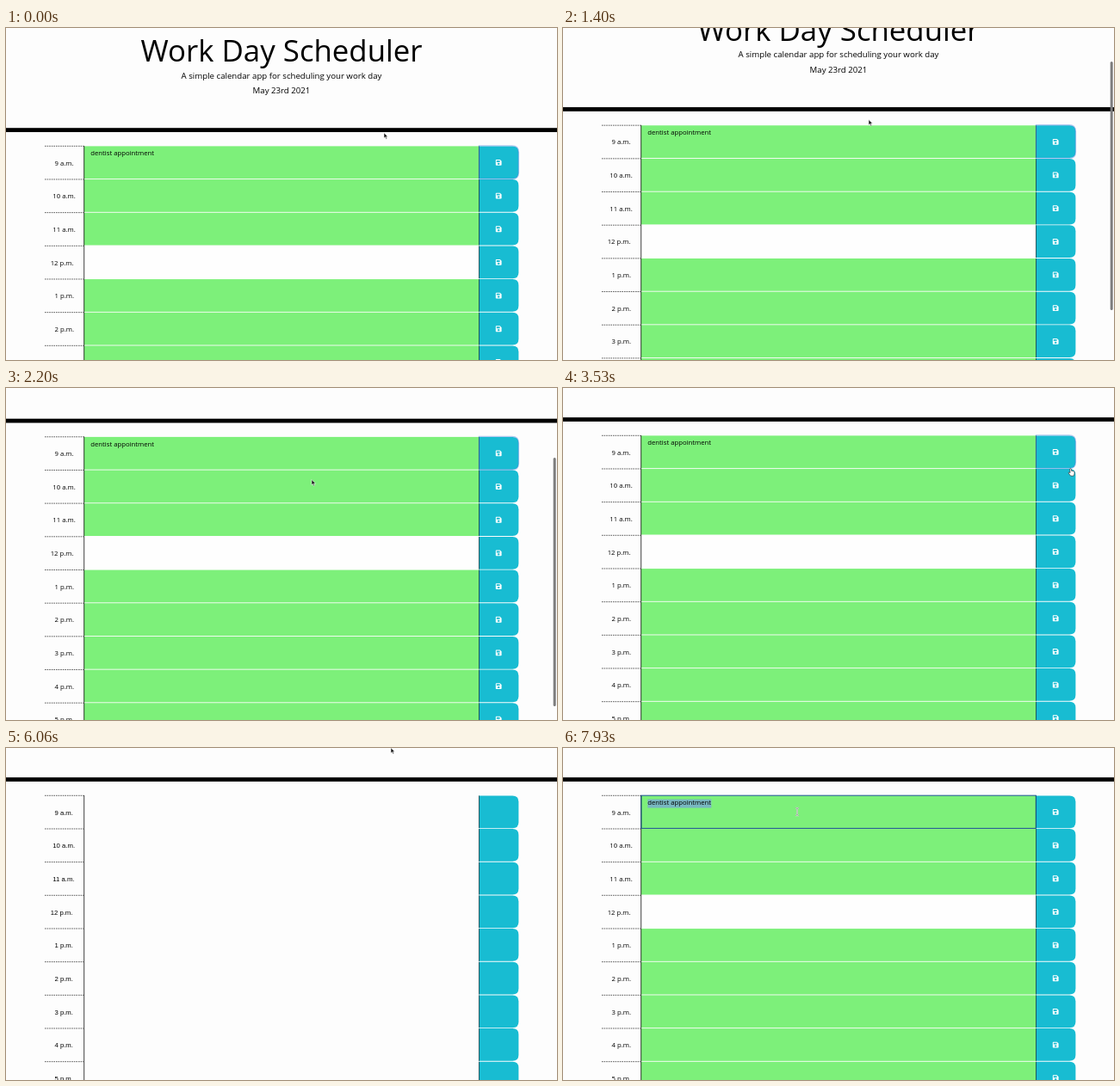
These frames come from a looping animation (640x386 px, 8 s). An HTML page:

```html
<!DOCTYPE html>
<html lang="en">
<head>
<meta charset="utf-8">
<title>Work Day Scheduler</title>
<style>
  html, body { margin: 0; width: 100%; height: 100%; overflow: hidden; background: #fdfdfd; }
  svg { display: block; width: 640px; height: 386px; }
  text { font-family: "Open Sans", "Noto Sans", sans-serif; font-size: 7.73px; fill: #000; white-space: pre; }
  .title { font-size: 34.8px; }
  .lead { font-size: 9.67px; }
  .unstyled text { font-family: "Liberation Sans", Arial, sans-serif; }
  .unstyled .slot, .unstyled .icon, .unstyled .note { display: none; }
</style>
</head>
<body>
<svg id="stage" viewBox="0 0 640 386">
  <g id="page">
    <text class="title" x="320" y="39" text-anchor="middle">Work Day Scheduler</text>
    <text class="lead" x="320" y="58.6" text-anchor="middle">A simple calendar app for scheduling your work day</text>
    <text class="lead" x="320" y="75.9" text-anchor="middle">May 23rd 2021</text>
    <rect y="116.2" width="640" height="4.83"/>
    <g id="rows"></g>
    <rect id="selection" x="98.3" y="141.6" width="74" height="10" fill="#78b7c0"/>
    <text class="note" x="98.3" y="148.4">dentist appointment</text>
    <rect id="outline" x="90.9" y="137.2" width="458.4" height="38.2" fill="none" stroke="#14508c"/>
    <path id="ring" fill="none" stroke="#5082dc" stroke-opacity=".42" stroke-width="1.4"/>
  </g>
  <rect id="thumb" x="635.7" width="3" height="289" rx="1.5" fill="#7d7d7d"/>
  <g id="pointer" stroke-linejoin="round">
    <path id="arrow" d="M0 0V6.3L1.5 5L2.5 7.4L3.6 6.9L2.6 4.6H4.5Z" fill="#111" stroke="#fff" stroke-width=".6"/>
    <path id="hand" d="M-1.3 0Q-.5 -.9 .2 0L.7 2.4Q3.2 2.2 4 3.4V6L3.2 8.2H-.3L-2.8 5Q-3 3.8 -1.8 4.1L-.9 4.7Z" fill="#fff" stroke="#222" stroke-width=".6"/>
    <g id="beam" fill="none">
      <path d="M-2 -4.5Q0 -4.5 0 -3.2Q0 -4.5 2 -4.5M0 -3.2V3.2M-2 4.5Q0 4.5 0 3.2Q0 4.5 2 4.5" stroke="#e6f6e6" stroke-width="1.7"/>
      <path d="M-2 -4.5Q0 -4.5 0 -3.2Q0 -4.5 2 -4.5M0 -3.2V3.2M-2 4.5Q0 4.5 0 3.2Q0 4.5 2 4.5" stroke="#667766" stroke-width=".6"/>
    </g>
  </g>
</svg>
<script>
const LOOP = 8000, ROW = 38.67, TOP = 137, LEFT = 90.5, RIGHT = 549.5, EDGE = 595.4;
const $ = id => document.getElementById(id);
const show = (id, on) => $(id).setAttribute("visibility", on ? "visible" : "hidden");

const buttonPath = (y, h, r) =>
  `M${RIGHT} ${y}H${EDGE - r}Q${EDGE} ${y} ${EDGE} ${y + r}V${y + h - r}Q${EDGE} ${y + h} ${EDGE - r} ${y + h}H${RIGHT}Z`;

// Floppy disk with a label and a hub cut out
const DISK = "M-2.7 -3.4H1.6L3.4 -1.6V2.7Q3.4 3.4 2.7 3.4H-2.7Q-3.4 3.4 -3.4 2.7V-2.7Q-3.4 -3.4 -2.7 -3.4Z" +
  "M-2.4 -2.4V-.5H1.4V-2.4ZM0 .5A1 1 0 1 0 0 2.4A1 1 0 1 0 0 .5Z";

function buildRow(hour, i) {
  const y = TOP + i * ROW;
  const label = `${hour > 12 ? hour - 12 : hour} ${hour < 12 ? "a" : "p"}.m.`;
  const x = hour === 12 ? 51.7 : hour === 10 || hour === 11 ? 54.3 : 56.5;
  return `
    <path d="M45 ${y + .3}H${LEFT}" stroke="#333" stroke-width=".8" stroke-dasharray="1.6 1"/>
    <text x="${x}" y="${y + 22.6}">${label}</text>
    <rect class="slot" x="${LEFT}" y="${y + .4}" width="${RIGHT - LEFT}" height="${ROW - .9}" fill="${hour === 12 ? "#fefefe" : "#7df07a"}"/>
    <path d="M${LEFT + .2} ${y}V${y + ROW}" stroke="#111" stroke-width=".8"/>
    <path d="${buttonPath(y + .4, ROW - .9, 7)}" fill="#18bcd2"/>
    <path d="M${RIGHT} ${y + .4}V${y + ROW - .5}" stroke="#0d3a42" stroke-width=".8"/>
    <path class="icon" transform="translate(572.2 ${y + 19.4})" d="${DISK}" fill="#fff" fill-rule="evenodd"/>`;
}
$("rows").innerHTML = [9, 10, 11, 12, 13, 14, 15, 16, 17].map(buildRow).join("");
$("ring").setAttribute("d", buttonPath(TOP - .1, ROW, 7.5));

const scrollKeys = [[930, 0], [1130, 5], [1400, 24], [1600, 47], [1800, 66], [2000, 76], [2200, 80.5], [2460, 82]];
const pointerKeys = [
  [60, 439, 121.8], [460, 355, 106.5], [2600, 355, 106.5], [3260, 613, 92], [3400, 613, 92], [3530, 590, 94],
  [4060, 573, 79], [4530, 573, 79], [5000, 447, -.3], [6600, 447, -.3], [7130, 272, 74]
];
const linear = k => k;
const smooth = k => k * k * (3 - 2 * k);

function sample(keys, t, ease) {
  if (t <= keys[0][0]) return keys[0].slice(1);
  const n = keys.findIndex(key => key[0] > t);
  if (n < 0) return keys[keys.length - 1].slice(1);
  const a = keys[n - 1], b = keys[n], k = ease((t - a[0]) / (b[0] - a[0]));
  return a.slice(1).map((v, i) => v + (b[i + 1] - v) * k);
}

function drawPointer(t, scroll) {
  const [x, y] = sample(pointerKeys, t, smooth);
  const inRows = t > 2600 && y > TOP - scroll;
  const overButton = inRows && x > RIGHT && x < EDGE;
  const overSlot = inRows && x > LEFT && x <= RIGHT;
  $("pointer").setAttribute("transform", `translate(${x} ${y})`);
  show("hand", overButton);
  show("beam", overSlot);
  show("arrow", !overButton && !overSlot);
}

function render(t) {
  const [scroll] = sample(scrollKeys, t, linear);
  $("page").setAttribute("transform", `translate(0 ${-scroll})`);
  $("page").setAttribute("class", t >= 5930 && t < 6130 ? "unstyled" : "");
  $("thumb").setAttribute("y", 21.2 + .743 * scroll);
  $("thumb").setAttribute("opacity", t < 930 ? 0 : Math.max(0, Math.min(1, (2870 - t) / 270)));
  show("ring", t < 5470);
  show("outline", t >= 7400);
  show("selection", t >= 7930);
  drawPointer(t, scroll);
}

const start = performance.now();
function tick() {
  render((performance.now() - start) % LOOP);
  requestAnimationFrame(tick);
}
tick();
</script>
</body>
</html>
```
